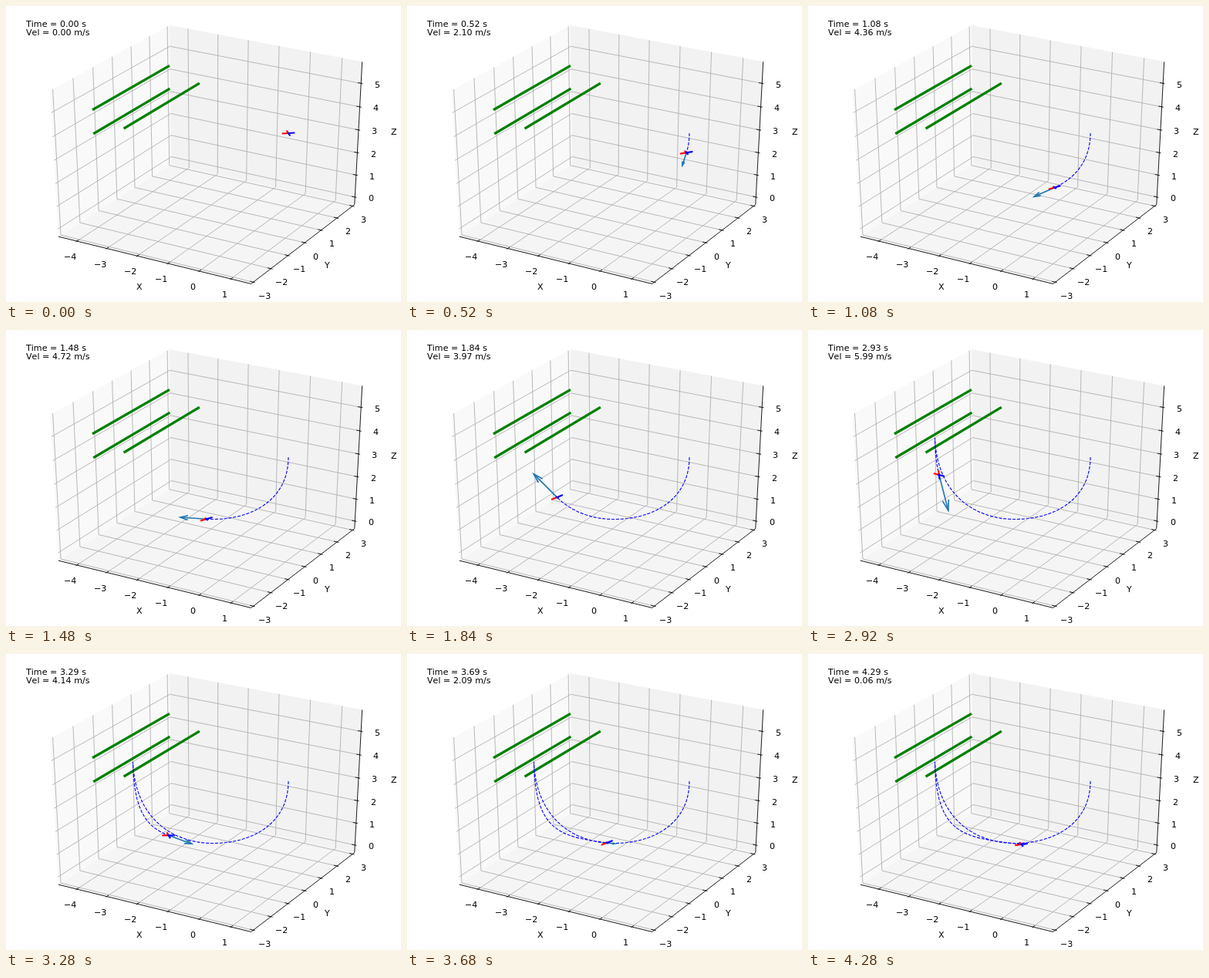
Recreate the animation shown at these times as an HTML page with a canvas. Size 512x384 px, loop 4320 ms.

```html
<!DOCTYPE html>
<html>
<head>
<meta charset="utf-8">
<style>
html, body { margin: 0; width: 100%; height: 100%; overflow: hidden; background: #fff; }
canvas { display: block; }
</style>
</head>
<body>
<canvas id="stage" width="512" height="384"></canvas>
<script>
const ctx = document.getElementById('stage').getContext('2d');
const STEP = 40, FRAMES = 108;
const MID = [-1.5, 0, 2.78]; // centre of the plotted volume, 6 units per side
const E = 25 / 48;           // half size of the drawn box

// Swing down, climb to the bars, fall back: three Bezier curves on the screen
const path = [
  [[366, 165], [366, 218], [322, 245.5], [268, 245.5]],
  [[268, 245.5], [215, 245.5], [167, 212], [164.5, 140]],
  [[164.5, 140], [166, 238], [205, 238], [276.5, 247]]
];

// Key moments; progress counts curves, rate is its change per second
const keys = [
  { t: 0, progress: 0, rate: 0, speed: 0, pitch: 0 },
  { t: 1.08, progress: .65, rate: 1.03, speed: 4.36, pitch: .45 },
  { t: 1.48, progress: 1.052, rate: 1.07, speed: 4.72, pitch: .45 },
  { t: 2.28, progress: 1.947, rate: .27, speed: 3.05, pitch: .82 },
  { t: 2.6, progress: 2, rate: 0, speed: 1, pitch: 0 },
  { t: 2.92, progress: 2.2, rate: 1.23, speed: 5.99, pitch: -.75 },
  { t: 3.68, progress: 2.916, rate: .25, speed: 2.09, pitch: .6 },
  { t: 4.28, progress: 3, rate: 0, speed: .06, pitch: .15 }
];

function stateAt(time) {
  const t = Math.min(Math.max(time, 0), keys[keys.length - 1].t);
  const i = Math.max(1, keys.findIndex(k => k.t >= t));
  const a = keys[i - 1], b = keys[i], h = b.t - a.t, s = (t - a.t) / h, r = 1 - s;
  const mix = name => a[name] * r + b[name] * s;
  const progress = a.progress * r * r * (1 + 2 * s) + b.progress * s * s * (1 + 2 * r)
    + h * s * r * (a.rate * r - b.rate * s);
  const part = Math.min(Math.floor(progress), path.length - 1);
  const u = progress - part, w = 1 - u;
  const [p0, p1, p2, p3] = path[part];
  const [x, y] = [0, 1].map(c =>
    w * w * w * p0[c] + 3 * w * w * u * p1[c] + 3 * w * u * u * p2[c] + u * u * u * p3[c]);
  return { x, y, speed: mix('speed'), pitch: mix('pitch') };
}

// Perspective view at elevation 30, azimuth -60, distance 10
function project([x, y, z]) {
  const r = Math.sqrt(3);
  const w = 10 - (r / 4 * x - .75 * y + z / 2);
  const u = (r / 2 * x + y / 2) / w;
  const v = (-x / 4 + r / 4 * y + r / 2 * z) / w;
  return [(u + .095) / .185 * 512, 384 - (v + .095) / .185 * 384];
}

const unit = (value, axis) => (value - MID[axis]) / 6;

function line(points, color, width, cap = 'butt') {
  ctx.beginPath();
  points.forEach(p => ctx.lineTo(...p));
  ctx.strokeStyle = color;
  ctx.lineWidth = width;
  ctx.lineCap = cap;
  ctx.stroke();
}

const line3 = (points, ...style) => line(points.map(project), ...style);

function pane(points, color) {
  ctx.beginPath();
  points.forEach(p => ctx.lineTo(...project(p)));
  ctx.fillStyle = color;
  ctx.fill();
}

function text(str, x, y, centred = true) {
  ctx.font = '11.11px "DejaVu Sans", sans-serif';
  ctx.fontKerning = 'none';
  ctx.fillStyle = '#000';
  const left = centred ? x - ctx.measureText(str).width / 2 : x;
  ctx.fillText(str, Math.round(left), Math.round(y));
}

const axes = [
  { from: -4, to: 1, shift: [-8.4, 24], name: ['X', 172.5, 368],
    grid: v => [[v, -E, -E], [v, E, -E], [v, E, E]],
    tick: v => [[v, -E - .0087, -E], [v, -E + .0174, -E]] },
  { from: -3, to: 3, shift: [14.2, 21.5], name: ['Y', 416.5, 340],
    grid: v => [[E, v, -E], [-E, v, -E], [-E, v, E]],
    tick: v => [[E + .0087, v, -E], [E - .0174, v, -E]] },
  { from: 0, to: 5, shift: [21, 5.5], name: ['Z', 502.5, 167],
    grid: v => [[E, E, v], [-E, E, v], [-E, -E, v]],
    tick: v => [[E + .0087, E, v], [E - .0174, E, v]] }
];

function drawPlot() {
  pane([[-E, -E, -E], [-E, E, -E], [-E, E, E], [-E, -E, E]], '#f9f9f9');
  pane([[-E, E, -E], [E, E, -E], [E, E, E], [-E, E, E]], '#f2f2f2');
  pane([[-E, -E, -E], [E, -E, -E], [E, E, -E], [-E, E, -E]], '#f5f5f5');

  axes.forEach((axis, k) => {
    for (let n = axis.from; n <= axis.to; n++) line3(axis.grid(unit(n, k)), '#b0b0b0', .89);
  });
  line3([[-E, -E, -E], [E, -E, -E], [E, E, -E], [E, E, E]], '#000', .89);
  axes.forEach((axis, k) => {
    for (let n = axis.from; n <= axis.to; n++) {
      const v = unit(n, k);
      line3(axis.tick(v), '#000', .89);
      const [x, y] = project(axis.grid(v)[0]);
      text(String(n).replace('-', '\u2212'), x + axis.shift[0], y + axis.shift[1]);
    }
    text(...axis.name);
  });

  // Bars: x and height above the centre
  [[-4, 2], [-4, 1], [-3, 1.5]].forEach(([x, z]) =>
    line3([-2, 2].map(y => [unit(x, 0), y / 6, z / 6]), '#008000', 3.33, 'square'));
}

function drawArrow(x, y, dx, dy) {
  const len = Math.hypot(dx, dy);
  if (len < 1) return;
  const tip = [x + dx, y + dy], dir = Math.atan2(dy, dx);
  const barb = turn => [
    tip[0] - .3 * len * Math.cos(dir + turn),
    tip[1] - .3 * len * Math.sin(dir + turn)
  ];
  line([[x, y], tip], '#1f77b4', 1.67);
  line([barb(.29), tip, barb(-.29)], '#1f77b4', 1.67);
}

// Four arms in a cross, pitched about the y axis; the front pair is red
function drawCraft({ x, y, pitch }) {
  const reach = .11, c = Math.cos(pitch) * reach, s = Math.sin(pitch) * reach;
  const arm = (front, side) => line([[x, y], [
    x + front * 41 * c + side * 25 * reach,
    y + front * (10 * c - 31 * s) - side * 14 * reach
  ]], front < 0 ? '#f00' : '#00f', 2.1, 'square');
  for (const front of [-1, 1]) for (const side of [-1, 1]) arm(front, side);
}

function draw(frame) {
  const t = frame * STEP / 1000, now = stateAt(t);
  ctx.fillStyle = '#fff';
  ctx.fillRect(0, 0, 512, 384);
  drawPlot();

  const trail = Array.from({ length: frame + 1 }, (_, i) => {
    const { x, y } = stateAt(i * STEP / 1000);
    return [x, y];
  });
  ctx.setLineDash([4.1, 1.8]);
  line(trail, '#00f', 1.11);
  ctx.setLineDash([]);

  // The arrow shows the way covered in 0.2 s at the present velocity
  const before = stateAt(t - .01), after = stateAt(t + .01);
  drawArrow(now.x, now.y, (after.x - before.x) * 10, (after.y - before.y) * 10);
  drawCraft(now);

  text(`Time = ${(frame * .0401).toFixed(2)} s`, 26, 27, false);
  text(`Vel = ${now.speed.toFixed(2)} m/s`, 26, 38, false);
}

const start = performance.now();
function tick() {
  const elapsed = Math.max(0, performance.now() - start);
  draw(Math.floor(elapsed / STEP) % FRAMES);
  requestAnimationFrame(tick);
}
tick();
</script>
</body>
</html>
```
